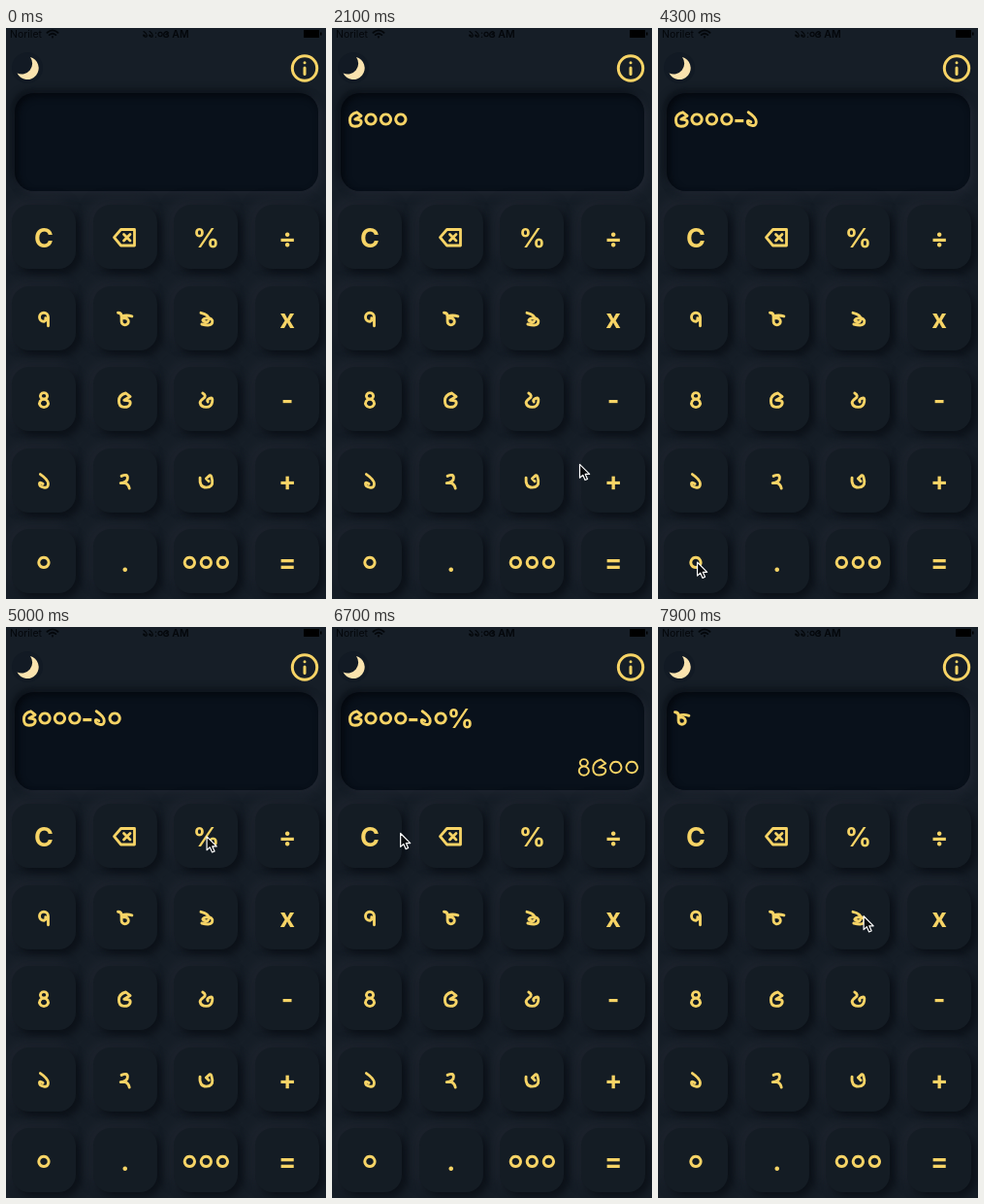
Animation of 330 by 588 pixels, one loop 8000 ms. Source, as an HTML page:

```html
<!DOCTYPE html>
<html lang="bn">
<head>
<meta charset="utf-8">
<title>Calculator</title>
<style>
  html, body { margin: 0; width: 100%; height: 100%; overflow: hidden; background: #161e27; }
  #stage { position: relative; width: 330px; height: 588px; overflow: hidden; }
  .key, .screen { position: absolute; }
  .key {
    width: 66px; height: 66px; border-radius: 18px; background: #141c24;
    box-shadow: 5px 5px 10px #0b1017, -5px -5px 11px #1e242e;
  }
  .screen {
    left: 9px; top: 67px; width: 313px; height: 101px; border-radius: 20px; background: #09111b;
    box-shadow: inset 3px 3px 7px #04080e, 4px 4px 9px #1f2530, -3px -3px 7px #0c1219;
  }
  svg { position: absolute; left: 0; top: 0; }
  text { font: 700 27px Inter, "Liberation Sans", sans-serif; text-anchor: middle; fill: #f7d466; }
  .line { fill: none; stroke: #f7d466; stroke-linecap: round; stroke-linejoin: round; }
  .status text { font-size: 10.5px; font-weight: 400; fill: #04070b; }
  .status .line { stroke: #04070b; }
</style>
</head>
<body>
<div id="stage">
  <div class="screen"></div>
  <svg id="art" width="330" height="588" viewBox="0 0 330 588">
    <g class="status">
      <text x="20.5" y="10">Norilet</text>
      <path class="line" stroke-width="1.8" d="M42.500 4.800Q48 0 53.500 4.800M44.700 7.100Q48 4.300 51.300 7.100M48 9V9.500"/>
      <g id="clock"></g>
      <text x="154.500" y="9.500">:</text>
      <text x="180" y="10" style="font-weight:600">AM</text>
      <path d="M307 2H323V10H307ZM324 4.500H325.500V7.500H324Z"/>
    </g>
    <circle cx="22" cy="41" r="16" fill="#121a24"/>
    <path fill="#fae3ae" d="M25 30A11.700 11.700 0 1 1 11.500 46.500A11 11 0 0 0 25 30Z"/>
    <g class="line" stroke-width="3">
      <circle cx="308" cy="41.500" r="12.700"/>
      <path d="M308 41V47.500M308 35.700V35.800"/>
    </g>
    <path class="line" stroke-width="2.800" d="M118.500 207.500H132.500V224H118.500L111.500 215.700ZM121.500 212.500L128 219M128 212.500L121.500 219"/>
    <g id="keys"></g>
    <g id="entry"></g>
    <path id="cursor" fill="#080a0d" stroke="#fff" stroke-width="1.200" stroke-linejoin="round"
      d="M.7 .8V14.700L3.900 11.800L6.200 17L8.700 15.900L6.400 10.900H10.800Z"/>
  </svg>
</div>
<script>
// Bengali numerals 0-9 as strokes around a centre point
const digits = [
  "M0-5.700a5.700 5.700 0 1 1-.1 0Z",
  "M-4-8Q5-2 5 3T0 7T-5 3T-1 3",
  "M-4-6Q3-9 3-4T-5 2H0Q4 3 5 8",
  "M-7-4Q-8 7 0 7T7-1T3-6T0-3T3 0",
  "M0-1a4 3.700 0 1 1 .1 0a5 4.600 0 1 1-.1 0",
  "M1-8Q-7-6-7 1T-1 8T6 4T-1 0L6-4Z",
  "M-4-8Q1-5-3-2T-7 3Q-6 8 0 8T7 2T4-2T2 2",
  "M5 8V-2A5 5 0 1 0 0 3Q3 2 2-1",
  "M-8-7Q-4-7-4-3V3A4 4 0 1 0 0-1H-4M-4-3Q2-5 8-3",
  "M-6-7Q3-5 3 0T-2 3T1-1Q8-1 7 4T-5 6"
];

const $ = id => document.getElementById(id);
const glyph = (c, x, y, scale = .9, weight = 3.2) => digits[c]
  ? `<path class="line" stroke-width="${weight}" transform="translate(${x} ${y}) scale(${scale})" d="${digits[c]}"/>`
  : `<text x="${x}" y="${y + 9.5}">${c}</text>`;

// A run of glyphs from left edge x, "step" wide per digit
function write(text, x, y, step, scale, weight) {
  return [...text].map(c => {
    const width = step * ({ "-": .68, "%": 1.62 }[c] || 1);
    x += width;
    return glyph(c, x - width / 2, y, scale, weight);
  }).join("");
}

// Centre of a key
const keyX = col => 39 + 83.7 * col;
const keyY = row => 215 + 83.6 * row;

// "<" stands for the backspace icon
["C <  % ÷", "7 8 9 x", "4 5 6 -", "1 2 3 +", "0 . 000 ="].forEach((row, r) =>
  row.split(/ +/).forEach((label, c) => {
    const x = keyX(c), y = keyY(r), box = document.createElement("div");
    box.className = "key";
    box.style.cssText = `left:${x - 33}px;top:${y - 33}px`;
    $("stage").insertBefore(box, $("art"));
    if (label === "<") return;
    const step = 17;
    $("keys").innerHTML += label.length > 1
      ? write(label, x - label.length * step / 2, y + 1, step)
      : glyph(label, x, y + 1);
  }));

$("clock").innerHTML = write("11", 140.5, 6.5, 6, .37, 3.4) + write("05", 156, 6.5, 6.2, .37, 3.4);

// Taps: arrival time, column, row, what the screen then holds
const taps = [
  [1200, 1.09, 2.17, "5"],
  [1800, 2, 4.1, "5000"],
  [2400, 3, 1.84, "5000-"],
  [3000, 2.09, .24, "5000-"],
  [3800, 0, 2.97, "5000-1"],
  [4300, .01, 4, "5000-10"],
  [4900, 2, 0, "5000-10%"],
  [5500, 3.05, 3.86, "5000-10%=4500"],
  [6700, .37, -.04, ""],
  [7400, 1, .98, "8"],
  [7900, 2.06, .98, "8"]
];
const travel = 400, press = 200;

function pointer(t) {
  const n = taps.findIndex(tap => tap[0] > t);
  const to = taps[n < 0 ? taps.length - 1 : n], from = taps[n - 1] || to;
  const p = Math.min(1, Math.max(0, 1 - (to[0] - t) / travel));
  const ease = 1 - (1 - p) ** 3;
  const mix = i => from[i] + (to[i] - from[i]) * ease;
  return [keyX(mix(1)), keyY(mix(2))];
}

const start = performance.now();
function draw() {
  const t = Math.floor((performance.now() - start) % 8000 / 100) * 100;
  const done = taps.filter(tap => tap[0] + press <= t).pop();
  const [entry, result = ""] = (done ? done[3] : "").split("=");
  $("entry").innerHTML = write(entry, 17, 94, 15.4) + write(result, 251.5, 144.5, 16.5, 1, 1.9);
  $("cursor").style.display = t < taps[0][0] ? "none" : "";
  $("cursor").setAttribute("transform", `translate(${pointer(t)})`);
  requestAnimationFrame(draw);
}
draw();
</script>
</body>
</html>
```
